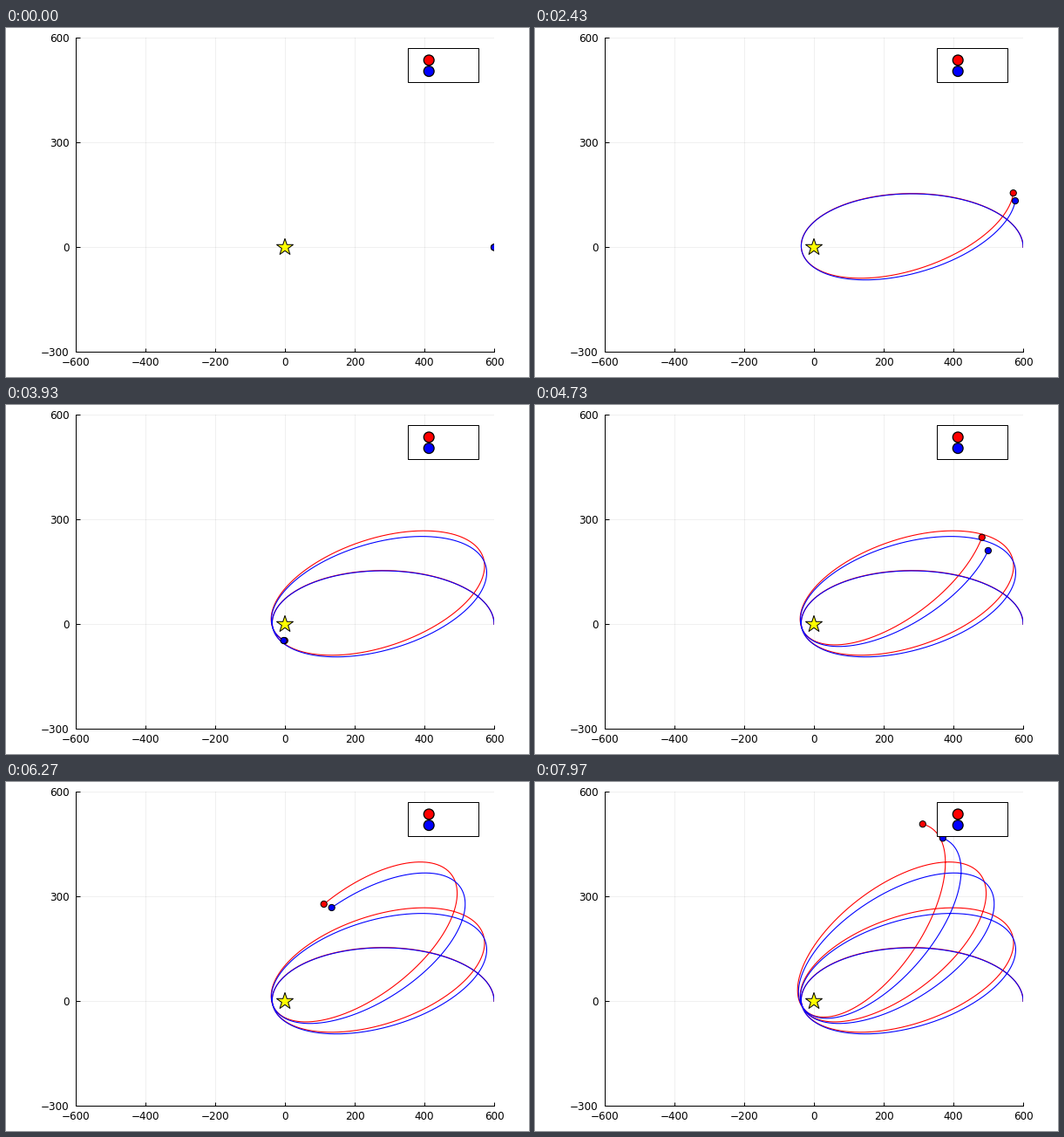
These frames come from a looping animation (600x400 px, 8 s). A matplotlib script:

```python
import numpy as np
import matplotlib.pyplot as plt
from matplotlib.animation import FuncAnimation
from matplotlib.patches import Circle, Polygon, Rectangle

PX = 0.72                 # points per pixel at 100 dpi
TICKS, TICK_MS = 400, 20  # 8 s loop; the motion itself runs at 30 steps per second
X0, Y0, SCALE = 320, 251.4, 0.4

# Quasi-Keplerian orbit, measured from aphelion
SEMI_MAJOR, ECC, ECC_TIME = 318.1, 0.8863, 0.8755
PERIOD = 78.36            # steps per revolution
BODIES = [("PN1", "red", 18.65), ("PN2", "blue", 16.4)]  # advance in degrees

E_GRID = np.linspace(0, 8 * np.pi, 8001)
M_GRID = E_GRID + ECC_TIME * np.sin(E_GRID)


def anomaly(step):
    return np.interp(2 * np.pi * step / PERIOD, M_GRID, E_GRID)


def orbit(E, advance):
    beta = ECC / (1 + np.sqrt(1 - ECC**2))
    r = SEMI_MAJOR * (1 + ECC * np.cos(E))
    true = E - 2 * np.arctan2(beta * np.sin(E), 1 + beta * np.cos(E))
    phi = (1 + advance / 360) * true
    return r * np.cos(phi), r * np.sin(phi)


def to_px(x, y):
    return X0 + SCALE * x, Y0 - SCALE * y


fig = plt.figure(figsize=(6, 4), dpi=100, facecolor="white")
ax = fig.add_axes([80 / 600, 28.6 / 400, 480 / 600, 360 / 400])
ax.set(xlim=(-600, 600), ylim=(-300, 600))
ax.set_xticks(range(-600, 601, 200), [])
ax.set_yticks(range(-300, 601, 300), [])
ax.tick_params(direction="in", length=4.5 * PX, width=PX)
ax.set_axisbelow(True)
ax.grid(color="black", alpha=0.06, linewidth=PX)
ax.spines[["top", "right"]].set_visible(False)
ax.spines[["left", "bottom"]].set_linewidth(PX)

# Overlay in pixel coordinates for bodies, labels and legend
over = fig.add_axes([0, 0, 1, 1])
over.set(xlim=(0, 600), ylim=(400, 0))
over.axis("off")


def label(x, y, text, ha):
    over.text(x, y + 4.4, text, ha=ha, va="baseline",
              family="DejaVu Sans", size=12 * PX)


def number(v):
    return str(v).replace("-", "\u2212")


def disc(x, y, radius, color, edge, zorder):
    return over.add_patch(Circle((x, y), radius, facecolor=color, zorder=zorder,
                                 edgecolor="black", linewidth=edge * PX))


for v in range(-600, 601, 200):
    label(to_px(v, 0)[0], 383, number(v), "center")
for v in range(-300, 601, 300):
    label(72.5, to_px(0, v)[1] + 0.3, number(v), "right")

over.add_patch(Rectangle((461, 23), 81, 39, facecolor="white",
                         edgecolor="black", linewidth=PX, zorder=5))

trails, dots = [], []
for i, (name, color, _) in enumerate(BODIES):
    trails += ax.plot([], [], color=color, linewidth=1.1 * PX, zorder=3 + i)
    dot = disc(X0, Y0, 3.6, color, 1, 2 + i)
    dot.set_clip_path(ax.patch)
    dots.append(dot)
    y = 36.9 + 12.7 * i
    disc(485.2, y, 5.9, color, 1.3, 6 + i)
    label(507.5, y + 0.2, name, "left")

angle = np.arange(10) * np.pi / 5
radius = np.where(np.arange(10) % 2, 0.382, 1) * 10.1
star = np.column_stack([X0 + radius * np.sin(angle), Y0 - radius * np.cos(angle)])
over.add_patch(Polygon(star, facecolor="yellow", edgecolor="black",
                       linewidth=PX, zorder=4))


def update(tick):
    step = (3 * tick + 2) // 5
    path = np.linspace(0, anomaly(step), 2 + 12 * step)
    for (_, _, advance), trail, dot in zip(BODIES, trails, dots):
        x, y = orbit(path, advance)
        trail.set_data(x, y)
        dot.center = to_px(x[-1], y[-1])
    return trails + dots


anim = FuncAnimation(fig, update, frames=TICKS, interval=TICK_MS,
                     repeat=True, repeat_delay=0)
plt.show()
```
